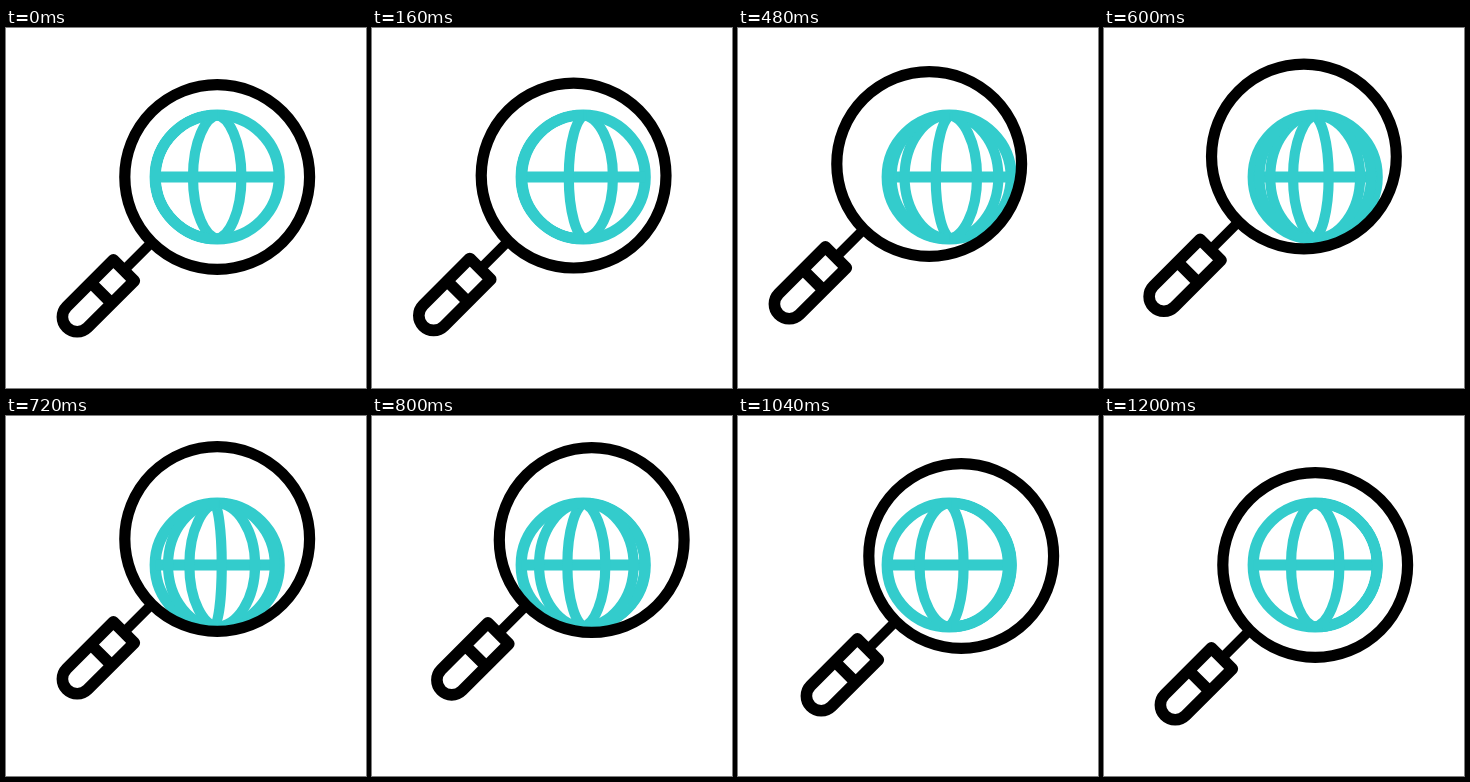
Animation, 360 px wide and 360 px high, one loop 1600 ms. Source, as an HTML page with a canvas:

```html
<!DOCTYPE html>
<html lang="en">
<head>
<meta charset="utf-8">
<title>Web search</title>
<style>
html, body { margin: 0; width: 100%; height: 100%; overflow: hidden; background: #fff; }
canvas { display: block; width: 360px; height: 360px; }
</style>
</head>
<body>
<canvas id="stage"></canvas>
<script>
const LOOP = 1600, MOTION = 1200, STEP = 20;
const TEAL = '#33cccc', BLACK = '#000';
const CX = 211.2, CY = 149, GLOBE_R = 62, LENS_R = 92.4, LINE = 11.2;

// Round trip of the magnifier: time and offset from rest.
const path = [
  { t: 0, x: 0, y: 0 },
  { t: 320, x: -18, y: -4 },
  { t: 480, x: -20, y: -13 },
  { t: 720, x: 0, y: -26 },
  { t: 880, x: 15, y: -21 },
  { t: 1040, x: 12, y: -9 },
  { t: MOTION, x: 0, y: 0 }
];

const canvas = document.getElementById('stage');
const ctx = canvas.getContext('2d');
const ratio = window.devicePixelRatio || 1;
canvas.width = canvas.height = 360 * ratio;

const unit = v => Math.max(0, Math.min(1, v));

// Smooth curve through the path points (cubic Hermite).
function pathAt(t, axis) {
  const last = path.length - 1;
  const i = Math.min(path.findLastIndex(p => p.t <= t), last - 1);
  const slope = k => {
    const a = path[Math.max(k - 1, 0)], b = path[Math.min(k + 1, last)];
    return (b[axis] - a[axis]) / (b.t - a.t);
  };
  const a = path[i], b = path[i + 1];
  const h = b.t - a.t, u = (t - a.t) / h, w = 1 - u;
  return a[axis] * (1 + 2 * u) * w * w + b[axis] * u * u * (3 - 2 * u)
    + h * u * w * (w * slope(i) - u * slope(i + 1));
}

// Longitudes in degrees: two resting lines speed up and leave on the right,
// two cross steadily, and two arrive as the mirror image of the leaving pair.
function longitudes(t) {
  const leave = (from, time) => from + (90 - from) * unit(time / 830) ** 1.5;
  const cross = start => -90 + 180 * unit((t - start) / 860);
  return [
    leave(23, t), leave(-23, t),
    cross(110), cross(270),
    -leave(-23, MOTION - t), -leave(23, MOTION - t)
  ];
}

function stroke(color, width, trace) {
  ctx.strokeStyle = color;
  ctx.lineWidth = width;
  ctx.beginPath();
  trace();
  ctx.stroke();
}

function drawMeridian(degrees) {
  const x = GLOBE_R * Math.sin(degrees * Math.PI / 180);
  // Lines near the middle stay bowed, with their poles pulled inwards.
  const pole = -4 * Math.sign(x) * (1 - Math.abs(x) / GLOBE_R);
  const side = x < 0 ? Math.PI / 2 : -Math.PI / 2;
  stroke(TEAL, LINE - 1, () =>
    ctx.ellipse(pole, 0, Math.abs(x - pole), GLOBE_R, 0, side, side + Math.PI));
}

function drawGlobe(t) {
  ctx.save();
  ctx.translate(CX, CY);
  stroke(TEAL, LINE, () => ctx.arc(0, 0, GLOBE_R, 0, 2 * Math.PI));
  stroke(TEAL, LINE, () => { ctx.moveTo(-GLOBE_R, 0); ctx.lineTo(GLOBE_R, 0); });
  longitudes(t).forEach(drawMeridian);
  ctx.restore();
}

function drawMagnifier(t) {
  const top = 132, divider = 164, end = 198, half = 14.8;
  ctx.save();
  ctx.translate(CX + pathAt(t, 'x'), CY + pathAt(t, 'y'));
  stroke(BLACK, LINE, () => ctx.arc(0, 0, LENS_R, 0, 2 * Math.PI));
  ctx.rotate(Math.PI * 3 / 4);
  stroke(BLACK, 10, () => { ctx.moveTo(LENS_R, 0); ctx.lineTo(top, 0); });
  stroke(BLACK, LINE + 0.4, () => {
    ctx.moveTo(top, -half);
    ctx.lineTo(end, -half);
    ctx.arc(end, 0, half, -Math.PI / 2, Math.PI / 2);
    ctx.lineTo(top, half);
    ctx.closePath();
    ctx.moveTo(divider, -half);
    ctx.lineTo(divider, half);
  });
  ctx.restore();
}

function drawFrame(elapsed) {
  const t = Math.min(Math.floor((elapsed % LOOP) / STEP) * STEP, MOTION);
  ctx.setTransform(ratio, 0, 0, ratio, 0, 0);
  ctx.lineJoin = 'round';
  ctx.fillStyle = '#fff';
  ctx.fillRect(0, 0, 360, 360);
  drawGlobe(t);
  drawMagnifier(t);
}

const start = performance.now();
function tick() {
  drawFrame(performance.now() - start);
  requestAnimationFrame(tick);
}
tick();
</script>
</body>
</html>
```
